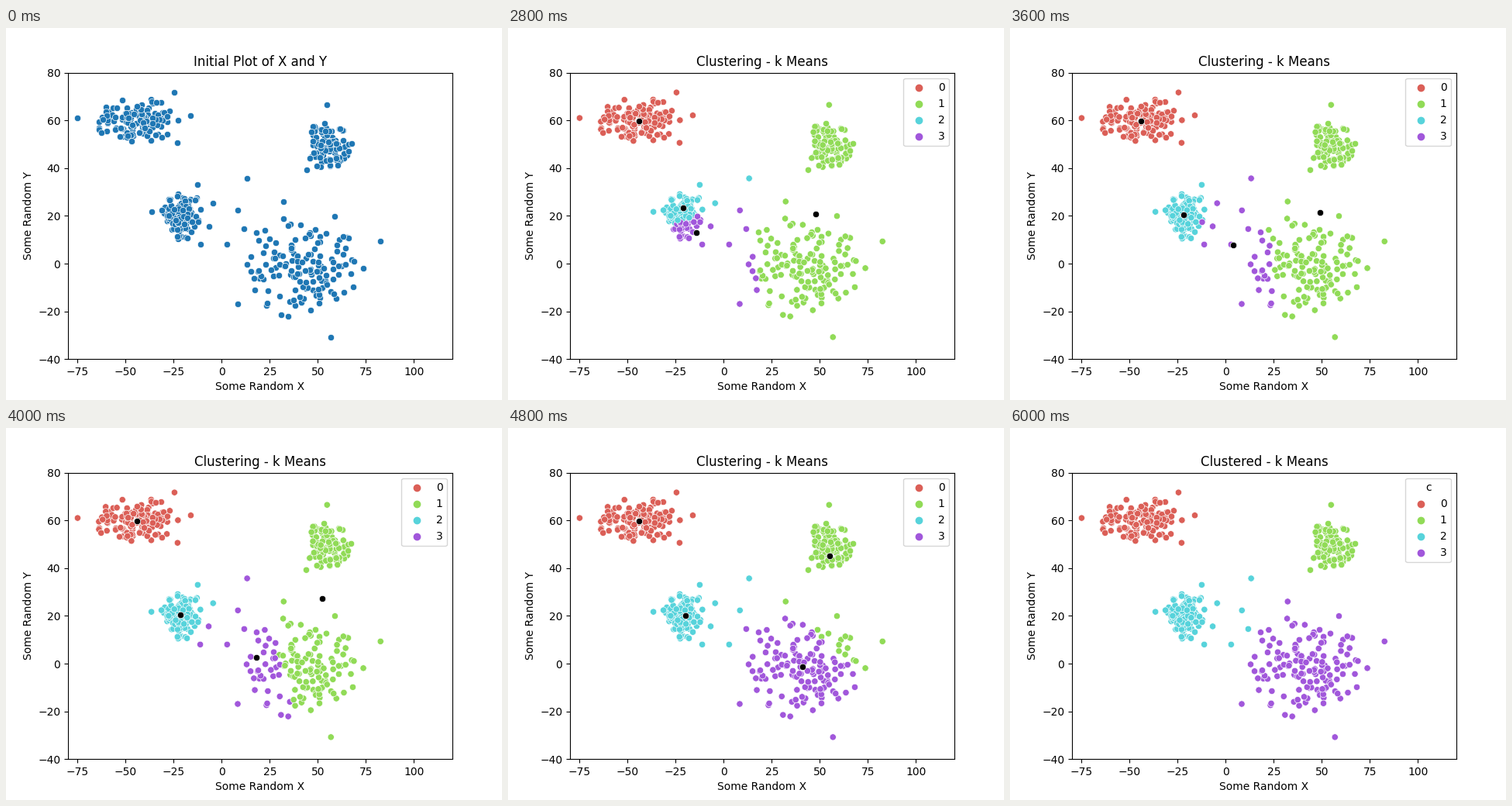
Recreate the animation shown at these times as a matplotlib script. Size 640 by 480 pixels, loop 8 s.

```python
import numpy as np
import matplotlib.pyplot as plt
from matplotlib.animation import FuncAnimation

STEP_MS = 400
FRAMES = 20
FIRST_STEP, LAST_STEP = 5, 14
PALETTE = np.array([(0.86, 0.3712, 0.34), (0.5688, 0.86, 0.34),
                    (0.34, 0.8288, 0.86), (0.6312, 0.34, 0.86)])
KEY_STEPS = (-1, 0, 2, 4, 6, 7, 9)
rng = np.random.default_rng(11)


def blob(center, spread, count, *far):
    """Gaussian cluster cut off at 2.2 sigmas, plus a few far points."""
    core = rng.normal(size=(count * 2, 2))
    core = core[np.hypot(*core.T) < 2.2][:count]
    return np.vstack([core * spread + center, far])


def path(*keys):
    """Centroid at every k-means step; the last key holds to the end."""
    keys = keys + keys[-1:] * (len(KEY_STEPS) - len(keys))
    steps = np.arange(KEY_STEPS[0], KEY_STEPS[-1] + 1)
    return np.stack([np.interp(steps, KEY_STEPS, axis)
                     for axis in zip(*keys)], axis=1)


points = rng.permutation(np.vstack([
    blob((-44.3, 59.8), (10.2, 4.4), 148,
         (-75, 61), (-24.6, 71.7), (-16.1, 62.1), (-23, 50.6)),
    blob((55, 49.8), (5.3, 4.7), 98,
         (54.8, 66.5), (44, 39.2), (67.4, 50.2)),
    blob((-20.8, 20), (5, 4.9), 145,
         (-36.6, 21.7), (-12.5, 33), (-4.5, 25.3), (-6.8, 15.6), (-11.2, 8)),
    blob((42.5, 0), (15, 10.6), 142,
         (13.2, 35.7), (8.4, 22.3), (11.7, 14.5), (2.8, 8), (32.2, 26),
         (82.6, 9.3), (8.3, -16.9), (56.8, -30.8)),
]))

centroids = np.array([
    path((-50, 58), (-44.5, 59.7), (-44.3, 59.6)),
    path((41, -6), (47.3, 19.7), (48, 20.7), (49.2, 21.3), (55, 33),
         (55, 45), (54.5, 50)),
    path((-18, 24), (-20.1, 23.5), (-21, 23.3), (-21.8, 20.6), (-21, 20),
         (-20, 20)),
    path((-18, 14), (-20.1, 15.1), (-14.4, 13), (4, 7.8), (32.3, -2.6),
         (41, -1.3), (42, -0.7)),
])


def nearest(centers):
    gaps = points[:, None] - centers[None]
    return np.hypot(gaps[..., 0], gaps[..., 1]).argmin(axis=1)


fig, ax = plt.subplots(figsize=(6.4, 4.8), dpi=100)
ax.set(xlim=(-80, 120), ylim=(-40, 80), xticks=range(-75, 101, 25),
       xlabel="Some Random X", ylabel="Some Random Y")
title = ax.set_title("")
dot = dict(s=36, edgecolors="white", linewidths=0.48)
cloud = ax.scatter(*points.T, **dot)
marks = ax.scatter(*centroids[:, 0].T, color="black", zorder=2, **dot)

keys = [ax.scatter([], [], color=[c], label=str(i))
        for i, c in enumerate(PALETTE)]
plain_legend = ax.legend(handles=keys, loc="upper right")
ax.add_artist(plain_legend)
titled_legend = ax.legend(handles=keys, loc="upper right", title="c")


def draw(frame):
    started = frame >= FIRST_STEP
    done = frame > LAST_STEP
    running = started and not done
    marks.set_visible(running)
    plain_legend.set_visible(running)
    titled_legend.set_visible(done)
    if not started:
        title.set_text("Initial Plot of X and Y")
        cloud.set_facecolor("C0")
    else:
        # Points are coloured by the centroids of the step before.
        step = min(frame, LAST_STEP) - FIRST_STEP
        title.set_text("Clustered - k Means" if done
                       else "Clustering - k Means")
        cloud.set_facecolor(PALETTE[nearest(centroids[:, step])])
        marks.set_offsets(centroids[:, step + 1])
    return cloud, marks, title, plain_legend, titled_legend


anim = FuncAnimation(fig, draw, frames=FRAMES, interval=STEP_MS,
                     repeat=True, repeat_delay=0)
plt.show()
```
